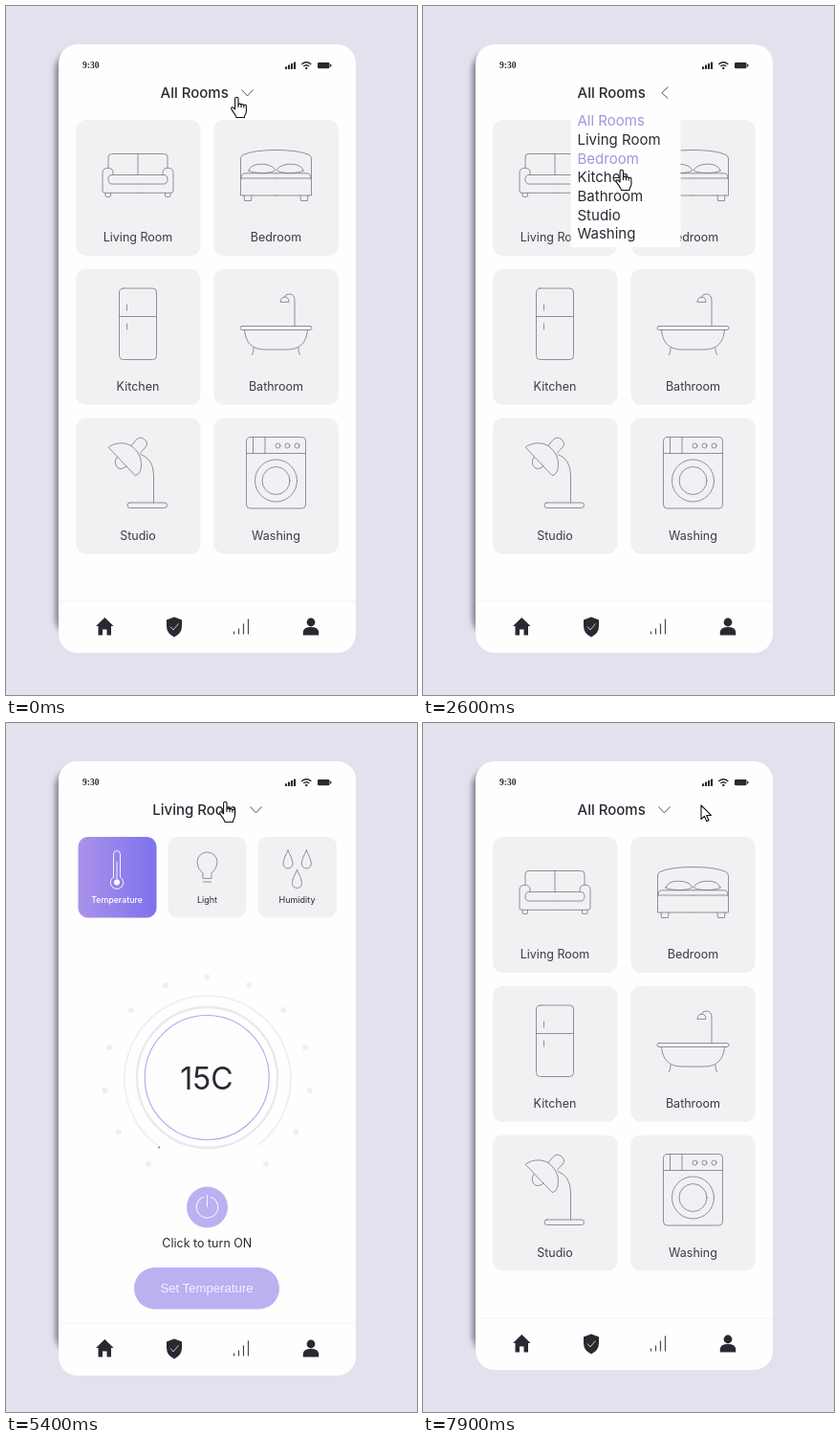
Recreate the animation shown at these times as an HTML page. Size 430 by 720 pixels, loop 8 s.

```html
<!DOCTYPE html>
<html lang="en">
<head>
<meta charset="utf-8">
<title>Smart home rooms</title>
<style>
  html, body { margin: 0; width: 100%; height: 100%; overflow: hidden; background: #e3e1ee; }
  svg { display: block; width: 430px; height: 720px; }
  text { font-family: Inter, sans-serif; fill: #2b2934; }
  .head { font-size: 15px; font-weight: 500; }
  .item { font-size: 15px; }
  .label { font-size: 12.5px; fill: #3d3b45; text-anchor: middle; }
  .small { font-size: 9px; text-anchor: middle; }
  .line { fill: none; stroke: #78767e; stroke-width: .8; stroke-linecap: round; stroke-linejoin: round; }
  .on .line { stroke: #fff; stroke-width: .9; }
  .on text { fill: #fff; font-weight: 500; }
  .chevron { fill: none; stroke: #55535c; stroke-width: 1; }
  .dark { fill: #2a2830; }
  .cursor { fill: #fff; stroke: #111; stroke-width: 1.1; stroke-linejoin: round; }
</style>
</head>
<body>
<svg id="stage" viewBox="0 0 430 720">
  <defs>
    <linearGradient id="violet"><stop stop-color="#aa92ea"/><stop offset="1" stop-color="#7d73ee"/></linearGradient>
    <filter id="blur" x="-10%" width="120%"><feGaussianBlur stdDeviation="2.6"/></filter>
    <clipPath id="roomsClip"><rect x="140" y="105" width="140" height="0"/></clipPath>
    <clipPath id="livingClip"><rect x="140" y="105" width="140" height="0"/></clipPath>
  </defs>
</svg>
<script>
const LOOP = 8000, STEP = 100;
const ROOMS = ['Living Room', 'Bedroom', 'Kitchen', 'Bathroom', 'Studio', 'Washing'];
const ITEMS = ['All Rooms', ...ROOMS];
const ROW = 19.65;

const path = (d, cls = 'line') => `<path class="${cls}" d="${d}"/>`;
const rect = (x, y, w, h, r, attrs = 'class="line"') =>
  `<rect x="${x}" y="${y}" width="${w}" height="${h}" rx="${r}" ${attrs}/>`;
const circle = (x, y, r, attrs = 'class="line"') => `<circle cx="${x}" cy="${y}" r="${r}" ${attrs}/>`;
const text = (x, y, cls, str, attrs = '') => `<text x="${x}" y="${y}" class="${cls}" ${attrs}>${str}</text>`;
const mirror = (axis, art) => art + `<g transform="translate(${2 * axis}) scale(-1 1)">${art}</g>`;

const ICONS = [
  // sofa
  mirror(138, path('M138 154.5H110.5Q107 154.5 107 158V169M138 176.5H111Q107 176.5 107 181.2T111 186H138' +
    'M112 176.5V174Q112 169.3 106.5 169.3T101 174.5V193Q101 195.3 103.3 195.3H138' +
    'M104 195.3V198Q104 199.5 105.5 199.5H108Q109.5 199.5 109.5 198V195.3')) + path('M138 154.5V176.5'),
  // bed
  mirror(282.5, path('M282.5 150.5Q259 150.5 248 155.5Q245.5 156.5 245.5 160V198H282.5M245.5 180H282.5' +
    'M246 180Q246 174.8 250 174.8H282.5M254 172Q256 165.2 267 165.2T282 171.5Q279 174.5 268 174.5T254 172Z' +
    'M249 198L249.5 203.5H256.5L257 198')),
  // fridge
  rect(118.5, 295, 39, 74.5, 4) + path('M118.5 324.5H157.5M126.5 312V318M126.5 332V338'),
  // bathtub
  rect(245, 334.5, 75, 4, 2) +
  path('M249.5 338.5Q251 359 271 359H294Q314 359 315.5 338.5M259 357.5Q259.5 361 257.5 364.5' +
    'M306 357.5Q305.5 361 307.5 364.5M302 334.5V308Q302 301 296.5 301Q292 301 291.5 304.2' +
    'M287 309Q287.3 304.3 291.7 304.3T296 309Z'),
  // lamp
  path('M107.5 461C112 457 122 455 130 459C139 465 143 474 141 484C140 488 138 490 135.5 490.5Z' +
    'M131 459.5L136 453.5Q140.500 449 145 453Q149.500 457 146 461L140.500 467' +
    'M116 471.500Q112.500 477 116 481.500T126 481M141 468.500Q154 473 154.500 490V519') + rect(127, 519, 41.5, 5.5, 2.7),
  // washing machine
  rect(251.5, 450.5, 62, 74.5, 4) + path('M251.5 467.5H313.5M258.500 450.500V467.500M271 450.500V467.500') +
  [284.5, 294.5, 304.5].map(x => circle(x, 459.5, 2.5)).join('') + circle(282.5, 496, 22) + circle(282.5, 496, 14.5)
];

function roomTile(i, fill = '#f2f0f3') {
  const col = i % 2, y = 119 + (i >> 1) * 155.7;
  return rect(73 + col * 144.3, y, 130.5, 142, 11, `fill="${fill}"`) + ICONS[i] +
    text(138 + col * 144.5, y + 127.3, 'label', ROOMS[i]);
}

function phone(height, dy) {
  const bars = [0, 1, 2, 3].map(i => rect(292 + i * 3, 63.2 - i * 1.6, 2.1, 2.8 + i * 1.6, .5, 'class="dark"')).join('');
  const levels = [3, 6, 11, 16].map((h, i) => `M${238.5 + i * 5} ${656.5 - h}V656.5`).join('');
  return rect(55, 40, 311, height, 20, 'fill="#fefefe"') +
    text(80, 65, '', '9:30', 'style="font:bold 9.5px Liberation Serif,serif"') + bars +
    '<g fill="none" stroke="#2a2830" stroke-width="1.4">' +
    '<path d="M309.300 61Q314.300 56.500 319.300 61M311.300 63.100Q314.300 60.400 317.300 63.100"/></g>' +
    circle(314.3, 65, 1.2, 'class="dark"') + rect(326, 59, 12.5, 6.2, 1.3, 'class="dark"') +
    rect(339, 60.8, 1.3, 2.6, .5, 'class="dark"') +
    `<g transform="translate(0 ${dy})">` +
    path('M55 622H366', '" stroke="#f2f1f5') +
    path('M103.300 639L94 648H96.500V657.500H101V651.500H105.500V657.500H110V648H112.600Z', 'dark') +
    path('M176 638.500L184 641.500V648Q184 655.500 176 659.500Q168 655.500 168 648V641.500Z', 'dark') +
    path('M172 648.500L175 652L180.500 645.500', '" fill="none" stroke="#c9c6d0" stroke-width="1') +
    path(levels, '" stroke="#55434f" stroke-width="1.2') +
    circle(319, 644, 4.4, 'class="dark"') +
    path('M310.800 657.500V654Q311.500 649 319 649T327.200 654V657.500Z', 'dark') + '</g>';
}

function header(id, title, x, shift) {
  return text(x, 96, 'head', title) +
    `<g id="${id}Chevron"><path class="chevron" d="M${246.5 + shift} 87.5l6 6.5l6 -6.5"/></g>`;
}

function menu(id, x, left, width) {
  return `<g id="${id}Menu" clip-path="url(#${id}Clip)">` + rect(left, 105, width, 147, 2, 'fill="#fefefe"') +
    ITEMS.map((name, i) => text(x, 125.3 + i * ROW, 'item', name)).join('') + '</g>';
}

function dial() {
  let dots = '';
  for (let i = -6; i <= 6; i++) {
    const a = i * 24.3 * Math.PI / 180, r = 105 + Math.abs(i) * .75;
    dots += circle(210.5 + r * Math.sin(a), 370.5 - r * Math.cos(a), 3, 'fill="#f0eef3"');
  }
  return dots +
    '<path d="M160.500 443A87 87 0 1 1 264 441" fill="none" stroke="#f1eff4" stroke-width="2"/>' +
    circle(160.3, 443.5, 1.1, 'fill="#7e70dd"') +
    circle(210.5, 370.5, 73.5, 'fill="none" stroke="#ebe8f0" stroke-width="2.4"') +
    circle(210.2, 370.5, 65, 'fill="none" stroke="#b4a6ee" stroke-width="1.1"') +
    text(210, 382.5, '', '15C', 'style="font-size:32px;text-anchor:middle"');
}

const DROP = 'm0-10c2 5 5 9 5 14a5 5 0 0 1-10 0c0-5 3-9 5-14z';
const rooms = phone(636, 0) + header('rooms', 'All Rooms', 161.5, 0) + ROOMS.map((_, i) => roomTile(i)).join('') +
  `<g id="active" class="on">${roomTile(0, 'url(#violet)')}</g>` + menu('rooms', 161.5, 154.5, 115);

const living = phone(642, 5) + header('living', 'Living Room', 153.3, 9) +
  '<g class="on">' + rect(75.5, 119, 82, 84.5, 10, 'fill="url(#violet)"') +
  path('M112.500 161V137a3.500 3.500 0 0 1 7 0V161a6.700 6.700 0 1 1-7 0zM116 145V164') +
  circle(116, 166.5, 3, 'fill="#fff"') + text(116, 187.5, 'small', 'Temperature', 'style="font-size:8.8px"') + '</g>' +
  rect(169.5, 119, 82, 84.5, 10, 'fill="#f2f0f3"') +
  path('M206 162V157Q200 152 200 145.500a10.500 10.500 0 0 1 21 0Q221 152 215 157V162ZM206.500 166H214.500') +
  text(210.5, 187.5, 'small', 'Light') +
  rect(263.5, 119, 82.5, 84.5, 10, 'fill="#f2f0f3"') +
  path(`M295 143${DROP}M314.300 143${DROP}M304.500 163.500${DROP}`) + text(304.5, 187.5, 'small', 'Humidity') +
  dial() +
  circle(210.5, 506, 21.5, 'fill="#bab1f1"') +
  path('M207 495.300A11.200 11.200 0 1 0 214 495.300M210.500 493V506', '" fill="none" stroke="#f4f1fe" stroke-width="1.1') +
  text(210.3, 547.5, 'label', 'Click to turn ON', 'style="fill:#2b2934"') +
  rect(134, 569, 152, 43.5, 21.7, 'fill="#bab1f1"') +
  text(210, 595, '', 'Set Temperature', 'style="font:13.2px Liberation Sans,sans-serif;fill:#f5f2ff;text-anchor:middle"') +
  menu('living', 153.3, 146.5, 127);

const cursor = `<g id="hand" class="cursor"><path d="M-1.400 13V2a1.700 1.700 0 0 1 3.400 0V8a1.600 1.600 0 0 1 3 .4a1.500 1.500 0 0 1 2.800.6
  a1.400 1.400 0 0 1 2.600.9V15c0 3-2 3.500-2 6.500H0c0-2.500-3.500-5-5.200-9c-.6-1.700 1.200-2.300 2.300-1.200z"/>
  <path fill="none" d="M2 8v3M5 8.500v2.700M7.800 9.200v2.400"/></g>
  <path id="arrow" class="cursor" d="M0 0V14.500L3.400 11.400L5.800 16.800L8 15.800L5.600 10.600L10.400 10.400Z"/>`;

const $ = id => document.getElementById(id);
$('stage').insertAdjacentHTML('beforeend',
  rect(51, 47, 290, 612, 20, 'fill="#3a3548" opacity=".5" filter="url(#blur)"') +
  `<g>${rooms}</g><g id="living">${living}</g>${cursor}`);

// time, x, y of the pointer tip
const TRACK = [
  [0, 241, 95], [500, 212, 87], [1300, 212, 87], [2100, 224, 119], [2600, 207.5, 171], [3000, 200, 234],
  [3200, 196, 249], [3300, 196, 249], [3500, 192, 186], [3600, 190.5, 169], [3800, 192, 137], [4400, 192, 137],
  [4800, 216, 106], [4900, 226, 83], [5300, 229, 82], [5700, 229, 82], [6200, 247.5, 149],
  [6500, 192, 218], [7000, 172, 166], [7400, 153, 117], [7500, 153, 117], [7900, 291, 86], [8000, 291, 86]
];
const clamp = v => Math.min(1, Math.max(0, v));
const ramp = (t, from, to) => { const p = clamp((t - from) / (to - from)); return p * p * (3 - 2 * p); };

function tip(t) {
  const i = Math.max(1, TRACK.findIndex(k => k[0] >= t));
  const [t0, x0, y0] = TRACK[i - 1], [t1, x1, y1] = TRACK[i];
  const p = clamp((t - t0) / (t1 - t0));
  return [x0 + (x1 - x0) * p, y0 + (y1 - y0) * p];
}

function drawMenu(id, open, fade, axis, hover, selected) {
  $(id + 'Clip').firstElementChild.setAttribute('height', 147 * open);
  $(id + 'Menu').setAttribute('opacity', fade);
  $(id + 'Chevron').setAttribute('transform', `rotate(${90 * open * fade} ${axis} 91)`);
  $(id + 'Menu').querySelectorAll('text').forEach((el, i) => {
    el.style.fill = i === hover || i === selected ? '#a593e0' : '';
  });
}

function render(t) {
  const [x, y] = tip(t);
  const hover = Math.round((tip(Math.max(0, t - STEP))[1] - 120) / ROW); // highlight trails the pointer
  drawMenu('rooms', ramp(t, 1300, 1600), 1 - ramp(t, 4400, 4700), 252.8, hover, t < 4000 ? 0 : 1);
  drawMenu('living', ramp(t, 5600, 6000), 1, 261.8, hover, 1);
  $('active').setAttribute('opacity', t < 4900 ? ramp(t, 4400, 4700) : 0);
  $('living').setAttribute('opacity', t < 4900 ? 0 : 1 - ramp(t, 7500, 7900));
  const arrow = (t >= 4500 && t < 5300) || t >= 7600;
  $('hand').style.display = arrow ? 'none' : '';
  $('arrow').style.display = arrow ? '' : 'none';
  $(arrow ? 'arrow' : 'hand').setAttribute('transform', `translate(${x} ${y})`);
}

const start = performance.now();
function frame() {
  render(Math.floor((performance.now() - start) % LOOP / STEP) * STEP);
  requestAnimationFrame(frame);
}
frame();
</script>
</body>
</html>
```
